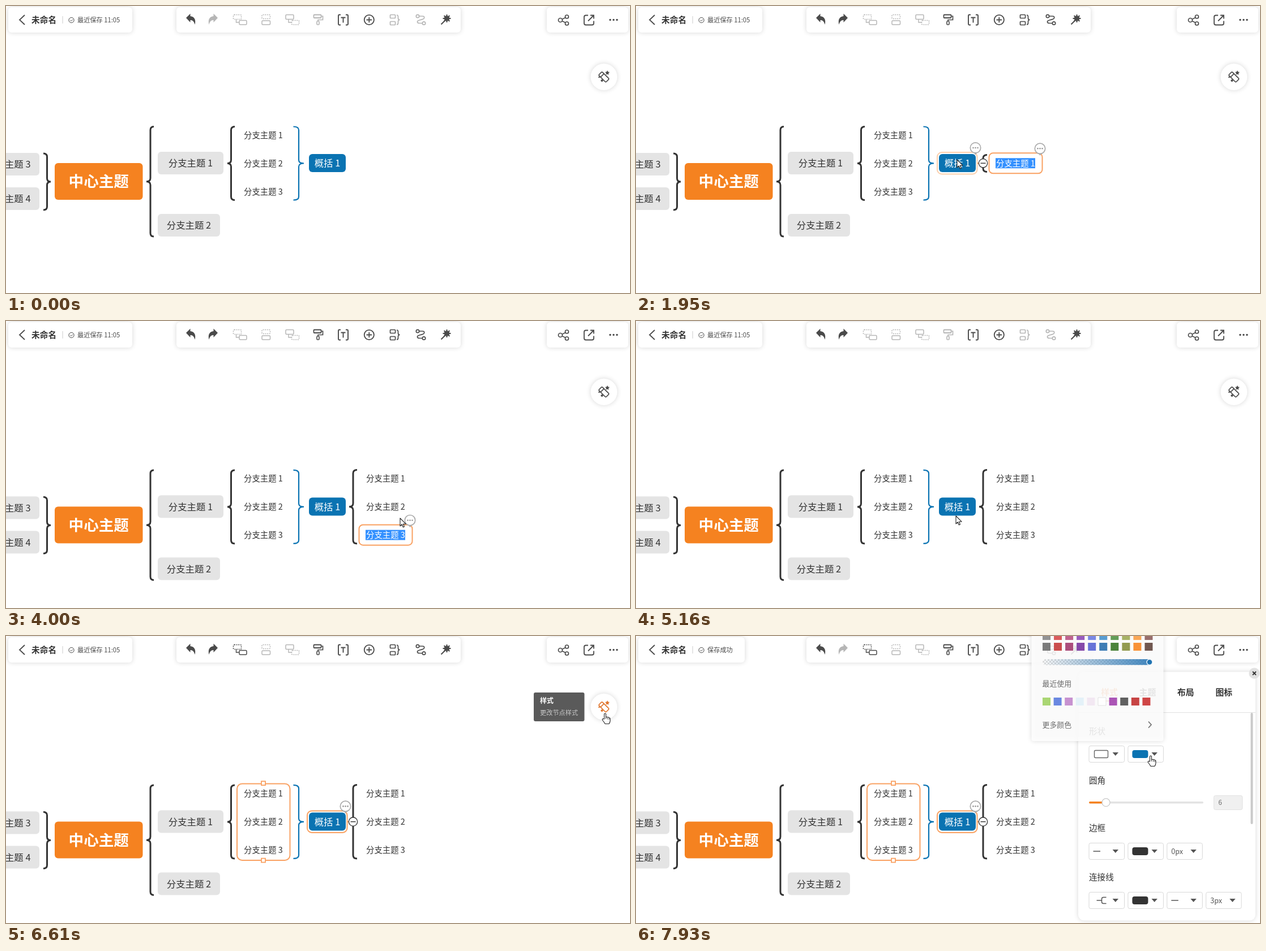
An HTML page with a canvas for the animation above (8 s loop, 1102 by 508 pixels).

```html
<!DOCTYPE html>
<html lang="zh-CN">
<head>
<meta charset="utf-8">
<style>
html, body { margin: 0; width: 100%; height: 100%; overflow: hidden; background: #fff; }
canvas { display: block; }
</style>
</head>
<body>
<canvas width="1102" height="508"></canvas>
<script>
const ctx = document.querySelector('canvas').getContext('2d');
const LOOP = 8000, STEP = 25.2;
const DARK = '#4a4a4a', DIM = '#b6b6b6', LINE = '#333', BLUE = '#0a73b2', ORANGE = '#f58220', RING = '#f9a162', PALE = '#fccfac';
const clamp = v => Math.max(0, Math.min(1, v));
const during = (t, a, b) => t >= a && t < b;

// ---- drawing helpers ----
function stroke(d, color, width = 1.6, dash = []) {
  ctx.strokeStyle = color;
  ctx.lineWidth = width;
  ctx.setLineDash(dash);
  ctx.stroke(new Path2D(d));
  ctx.setLineDash([]);
}
function fill(d, color) {
  ctx.fillStyle = color;
  ctx.fill(new Path2D(d));
}
function box(x, y, w, h, r, color, line, width = 1, dash = []) {
  ctx.beginPath();
  ctx.roundRect(x, y, w, h, r);
  if (color) { ctx.fillStyle = color; ctx.fill(); }
  if (line) {
    ctx.strokeStyle = line;
    ctx.lineWidth = width;
    ctx.setLineDash(dash);
    ctx.stroke();
    ctx.setLineDash([]);
  }
}
const dot = (x, y, r, color, line, width) => box(x - r, y - r, 2 * r, 2 * r, r, color, line, width);
function card(x, y, w, h, r) {
  ctx.save();
  ctx.shadowColor = 'rgba(0,0,0,.16)';
  ctx.shadowBlur = 9;
  box(x, y, w, h, r, '#fff');
  ctx.restore();
}
function text(s, x, y, size, color = LINE, align = 'left', weight = 400) {
  ctx.font = `${weight} ${size}px "Noto Sans CJK SC", "Noto Sans CJK", sans-serif`;
  ctx.textAlign = align;
  ctx.fillStyle = color;
  ctx.fillText(s, x, y + size * 0.375);
}

// ---- mind map ----
function brace(end, spine, tip, top, bottom, color = LINE, width = 3) {
  const mid = (top + bottom) / 2, r = 6;
  stroke(`M${end} ${top}Q${spine} ${top} ${spine} ${top + r}V${mid - r}Q${spine} ${mid} ${tip} ${mid}` +
    `Q${spine} ${mid} ${spine} ${mid + r}V${bottom - r}Q${spine} ${bottom} ${end} ${bottom}`, color, width);
}
function node(label, x, y, w, h, color, textColor, size = 16.4, weight = 400) {
  box(x, y, w, h, 6, color);
  text(label, x + w / 2, y + h / 2, size, textColor, 'center', weight);
}
function bubble(x, y) {
  dot(x, y, 9.2, '#fff', '#aaa', 1.7);
  fill(`M${x - 3} ${y + 8.5}h6l-3 4z`, '#aaa');
  for (const dx of [-4, 0, 4]) dot(x + dx, y, 1.3, '#999');
}
function drawMap(s) {
  ctx.save();
  ctx.translate(0, s.shift);
  for (const [n, y] of [[3, 260], [4, 321]]) {
    box(-57, y, 116, 40, 6, '#e4e4e4');
    text('分支主题 ' + n, 43.5, y + 20, 16.4, LINE, 'right');
  }
  brace(66, 72.5, 79, 261, 361);
  node('中心主题', 86, 278, 155.5, 65, ORANGE, '#fff', 26.6, 700);
  brace(261, 255, 248, 213.5, 408);
  node('分支主题 1', 268, 258, 116, 40, '#e4e4e4', LINE);
  node('分支主题 2', 268, 368, 110, 40, '#e4e4e4', LINE);
  brace(404, 397.5, 391, 213.5, 343.5);
  brace(507.5, 517, 526, 213.5, 343.5, BLUE, 2.2);
  for (let i = 0; i < 3; i++) text('分支主题 ' + (i + 1), 420, 228.5 + i * 50, 14.4);
  if (s.group) {
    box(408, 211, 93.5, 135.5, 9, null, s.group, 2);
    for (const y of [210, 346.5]) box(451, y - 3.3, 7, 7, 0, '#fff', s.group, 1.8);
  }
  if (s.ring) box(532, 259, 70.5, 38.5, 8, '#fff', s.ring, 2);
  node('概括 1', 535, 262, 65, 32, BLUE, '#fff');
  ctx.restore();

  const n = s.children, mid = 278.3 + s.shift;
  if (n) brace(620, 613, 606, 263.5, 293.5 + (n - 1) * 50.3);
  if (s.ring) {
    bubble(599.5, 251 + s.shift);
    if (n) {
      stroke(`M603 ${mid}H606`, RING, 2);
      dot(613, mid, 7.7, '#fff', LINE, 1.3);
      stroke(`M608.5 ${mid}h9`, LINE, 1.4);
    }
  }
  for (let i = 0; i < n; i++) {
    const y = 278.3 + i * 50.2, current = i === n - 1 && s.child;
    const editing = current === 'edit';
    if (current) box(623.5, y - 18, 94, 36, 7, '#fff', RING, 2);
    if (editing) box(635, y - 9, 70, 18, 0, '#3390ff');
    text('分支主题 ' + (i + 1), 636, y, 14.4, editing ? '#fff' : LINE);
    if (current) bubble(713.5, y - 26);
  }
}

// ---- top bars ----
const topicPair = (x, c, upperDash, lowerDash) => {
  box(x, 15.5, 14, 8, 1.5, null, c, 1.5, upperDash ? [2, 1.6] : []);
  box(x + 10.5, 25.5, 13, 7.5, 1.5, '#fff', c, 1.5, lowerDash ? [2, 1.6] : []);
  stroke(`M${x + 5} 24v5h5`, c, 1.4);
};
const undoShape = 'M318 21L325.5 13.5V18C332 18.5 336 23.5 333.5 33C332 27.5 330 25 325.5 25V29Z';

function drawBars(s) {
  card(4, 2, s.saved ? 188 : 219, 45, 6);
  stroke('M33 16L24 24.5L33 33', DARK, 1.8);
  text('未命名', 45, 24.5, 14.7, LINE, 'left', 700);
  stroke('M100 18V31', '#ccc', 1);
  dot(115.5, 25, 4.6, null, DARK, 1);
  stroke('M113.3 25l1.7 1.7l3-3', DARK, 1);
  text(s.status, 126, 24.8, 11.2, DARK);

  const tone = on => on ? DARK : DIM;
  card(301, 2, 502, 45, 6);
  fill(undoShape, DARK);
  ctx.save();
  ctx.translate(692, 0);
  ctx.scale(-1, 1);
  fill(undoShape, tone(s.redo));
  ctx.restore();
  topicPair(401.5, tone(s.sub), true, false);
  const sib = tone(s.sibling);
  box(452, 15.5, 14.5, 7, 1.5, null, sib, 1.5, [2, 1.6]);
  box(452, 26, 14.5, 7, 1.5, null, sib, 1.5);
  topicPair(494, sib, false, true);
  const c = tone(s.active);
  box(543.5, 15.5, 13, 5.5, 1, null, c, 1.8);
  stroke('M557 18h2.5v6.5h-8.5v2', c, 1.7);
  box(549, 27, 4, 6, 1, null, c, 1.6);
  stroke('M591 15.5h-2.5q-1.5 0-1.5 1.5v15q0 1.5 1.5 1.5h2.5M600 15.5h2.5q1.5 0 1.5 1.5v15q0 1.5-1.5 1.5h-2.5M591.5 20.5h8M595.5 20.5v9', DARK, 1.9);
  dot(641.3, 24.5, 8.6, null, DARK, 1.8);
  stroke('M636.5 24.5h9.6M641.3 19.7v9.6', DARK, 1.8);
  box(678.5, 15.5, 9, 6, 1, null, c, 1.7);
  box(678.5, 27.5, 9, 6, 1, null, c, 1.7);
  stroke('M690 16q2.5 0 2.5 3v2.5q0 3 3 3q-3 0-3 3v2.5q0 3-2.5 3', c, 1.7);
  dot(727, 18, 2.7, null, c, 1.7);
  dot(738, 30.5, 2.7, null, c, 1.7);
  stroke('M730 18h5.5q4 0 3 3.2q-.7 2-5 3l-4 1q-3.500 1-3 3.300q.5 2 4 2h4.500', c, 1.7);
  stroke('M768.5 32.5L776 25', DARK, 2);
  dot(778.5, 22, 4.8, DARK);
  for (let i = 0; i < 8; i++) {
    const a = i * Math.PI / 4;
    stroke(`M778.5 22l${7 * Math.cos(a)} ${7 * Math.sin(a)}`, DARK, 2);
  }

  card(955, 2, 144, 45, 6);
  stroke('M979 25L990 19.500M979 25L990 30.500', DARK, 1.6);
  for (const [x, y, r] of [[979, 25, 3.5], [990.5, 19, 3], [990.5, 31, 3]]) dot(x, y, r, '#fff', DARK, 1.7);
  stroke('M1028 16.500h-4q-3 0-3 3v11q0 3 3 3h11q3 0 3-3v-4M1032 16.500h6v6M1038 16.500L1028 26.500', DARK, 1.8);
  for (const x of [1067, 1073, 1079]) dot(x, 24.5, 1.7, DARK);
}

function drawStyleButton(hover) {
  const c = hover ? '#e0762e' : DARK;
  card(1032.5, 102, 47, 47, 23.5);
  ctx.save();
  ctx.translate(1056, 125.5);
  ctx.rotate(Math.PI / 4);
  box(-9, -4, 18, 8.5, 1.5, null, c, 1.7);
  stroke('M-4 -4v8.500', c, 1.6);
  ctx.restore();
  fill('M1062 114l1.200 2.600l2.800.4l-2 2l.5 2.800l-2.500-1.300l-2.500 1.300l.5-2.800l-2-2l2.800-.4z', c);
  dot(1047.500, 126, 1.3, c);
  fill('M1052.500 129.500l2.500 2.500l-2.500 2.500l-2.500-2.500z', c);
}
function drawTooltip() {
  box(932, 100, 89.5, 51, 3, '#5a5a5a');
  text('样式', 943, 114, 12, '#fff', 'left', 700);
  text('更改节点样式', 943, 136, 11.2, '#c8c8c8');
}

// ---- side panel ----
function select(x, y, content) {
  box(x + 0.5, y + 0.5, 62.5, 29, 3, '#fff', '#d8d8d8');
  fill(`M${x + 42} ${y + 12}h10.500l-5.250 6z`, '#555');
  if (content[0] === '#') box(x + 8, y + 8, 28, 14, 4, content);
  else if (content === 'shape') box(x + 10, y + 8.5, 24, 13, 2, null, '#666', 1.4);
  else if (content === 'line') stroke(`M${x + 8} ${y + 15}h12.500`, '#555', 1.5);
  else if (content === 'link') stroke(`M${x + 14} ${y + 15}h9M${x + 31} ${y + 9.5}h-5q-3 0-3 3v5q0 3 3 3h5`, '#555', 1.5);
  else text(content, x + 8, y + 15, 12.6, '#555');
}
function drawPanel(x) {
  ctx.save();
  ctx.translate(x, 0);
  card(0, 63.5, 313, 440, 10);
  ['样式', '主题', '布局', '图标'].forEach((s, i) =>
    text(s, 55 + i * 67.4, 99.5, 14.8, i ? LINE : '#ee7a2a', 'center', 700));
  stroke('M45 115H65', '#ee7a2a', 2);
  stroke('M0 135.500H313', '#e0e0e0', 1);
  [['形状', 169], ['圆角', 256], ['边框', 340], ['连接线', 427]].forEach(([s, y]) =>
    text(s, 19, y, 14.6, LINE, 'left', 500));
  const rows = [[194, 'shape', BLUE], [366, 'line', LINE, '0px'], [453, 'link', LINE, 'line', '3px']];
  for (const [y, ...cells] of rows) cells.forEach((cell, i) => select(18.5 + i * 68.9, y, cell));
  box(19, 293, 202, 3.5, 2, '#e3e3e3');
  box(19, 293, 29, 3.5, 2, ORANGE);
  dot(49, 294.7, 7, '#fff', '#c8c8c8', 1.2);
  box(239.5, 282.5, 50.5, 25, 3, '#f0f0f0', '#e2e2e2');
  text('6', 247.5, 295, 11.4, '#666');
  box(304.5, 136, 4, 197, 2, '#c9c9c9');
  dot(311, 66, 9.7, '#e2e2e2');
  stroke('M308 63l6 6m0-6l-6 6', LINE, 1.8);
  ctx.restore();
}

const palette = [
  ['#858585', '#d64545', '#b74d80', '#8a45b5', '#6878e0', '#4290cc', '#4e9040', '#9ca850', '#fa9c40', '#8a5a58'],
  ['#6a6a6a', '#c43434', '#a0356a', '#75309f', '#5260d4', '#236bac', '#33721f', '#858d38', '#f8831c', '#5c4038'],
  ['#9fd160', '#5678de', '#c084cb', '#e2f1f9', '#f2e6f2', '#fff', '#a03dad', '#4a4a4a', '#c02a2a', '#c92c2c']
];
function drawPopup(alpha) {
  ctx.save();
  ctx.globalAlpha = alpha;
  card(698.500, -20, 233, 206, 4);
  palette.forEach((row, r) => row.forEach((color, i) =>
    box(718 + i * 19.6 + (r < 2 ? i * 0.45 : 0), [-7, 12, 109][r], 14, 14, 0, color, color === '#fff' ? '#ddd' : null)));
  ctx.save();
  ctx.beginPath();
  ctx.roundRect(718, 41, 194, 10.5, 5.2);
  ctx.clip();
  for (let i = 0; i < 65; i++) for (let j = 0; j < 4; j++)
    if ((i + j) % 2) box(718 + i * 3, 41 + j * 3, 3, 3, 0, '#d6d6d6');
  const blend = ctx.createLinearGradient(718, 0, 912, 0);
  blend.addColorStop(0, 'rgba(35,115,180,0)');
  blend.addColorStop(1, 'rgb(35,115,180)');
  box(718, 41, 194, 10.5, 0, blend);
  ctx.restore();
  dot(907, 46.3, 5, '#1d70b0', '#fff', 1.5);
  text('最近使用', 717.5, 84, 12.9, '#555');
  text('更多颜色', 717.5, 157, 12.9, '#555');
  stroke('M905 151.500l5 5.500l-5 5.500', '#555', 1.6);
  ctx.restore();
}

// ---- pointer ----
const track = [
  [70, 1044, 491], [340, 659, 353], [600, 659, 353], [880, 567, 272], [2260, 567, 272], [2350, 609, 287],
  [2880, 609, 287], [3240, 696, 349], [4050, 696, 349], [4400, 628, 419], [4680, 628, 419], [5090, 565, 345],
  [5340, 565, 345], [5450, 568, 334], [5920, 568, 334], [6540, 1058, 137], [6750, 1058, 137], [6960, 1062, 139],
  [7240, 1062, 139], [7520, 909, 212]
];
function pointerAt(t) {
  const i = track.findIndex(k => k[0] > t);
  if (i < 0) return track[track.length - 1].slice(1);
  const [t0, x0, y0] = track[i - 1], [t1, x1, y1] = track[i];
  const p = (t - t0) / (t1 - t0), e = p * p * (3 - 2 * p);
  return [x0 + (x1 - x0) * e, y0 + (y1 - y0) * e];
}
function drawPointer(t) {
  if (t < 70) return;
  const [x, y] = pointerAt(t);
  const hand = during(t, 6480, 6900) || t >= 7480;
  const shape = hand
    ? 'M-1.500 10V1Q0-1 1.500 1V7Q3 5.500 4.500 7Q6 6 7 8Q9 7.500 9 10V13Q9 15.500 7 18.500H0Q-2 15-4.500 12Q-5.500 9.500-3.500 9.500Z'
    : 'M0 0V14L3.200 11L5.300 16L7.500 15L5.400 10.200H10Z';
  ctx.save();
  ctx.translate(x, y);
  ctx.lineJoin = 'round';
  fill(shape, '#fff');
  stroke(shape, '#222', 1.1);
  if (hand) stroke('M1.500 7v3M4.500 8v2.500M7 9v2', '#222', 0.9);
  ctx.restore();
}

function sceneAt(t) {
  const children = t < 1950 ? 0 : t < 2950 ? 1 : t < 3860 ? 2 : 3;
  const selected = during(t, 950, 1950) || t >= 5450;
  const hover = during(t, 790, 950) || during(t, 1950, 2950) || during(t, 5230, 5450);
  const child = !during(t, 1950, 4610) ? null
    : during(t, 2610, 2950) || during(t, 3580, 3860) ? 'selected' : 'edit';
  return {
    children, child,
    shift: Math.max(0, children - 1) * STEP,
    ring: selected ? RING : hover && PALE,
    group: selected ? RING : hover && !child && PALE,
    redo: during(t, 1950, 7030),
    sub: selected || child === 'selected',
    sibling: child === 'selected',
    active: selected || child,
    saved: t >= 7030,
    status: t < 6680 ? '最近保存 11:05' : t < 7030 ? '保存中...' : '保存成功'
  };
}

function draw(now) {
  const t = now % LOOP, scene = sceneAt(t);
  ctx.fillStyle = '#fff';
  ctx.fillRect(0, 0, 1102, 508);
  drawMap(scene);
  drawBars(scene);
  drawStyleButton(during(t, 6480, 6900));
  if (during(t, 6540, 6820)) drawTooltip();
  const slide = clamp((t - 7080) / 300);
  if (slide) drawPanel(781 + 322 * (1 - slide) ** 3);
  const fade = clamp((t - 7700) / 265);
  if (fade) drawPopup(fade);
  drawPointer(t);
  requestAnimationFrame(draw);
}
requestAnimationFrame(draw);
</script>
</body>
</html>
```
